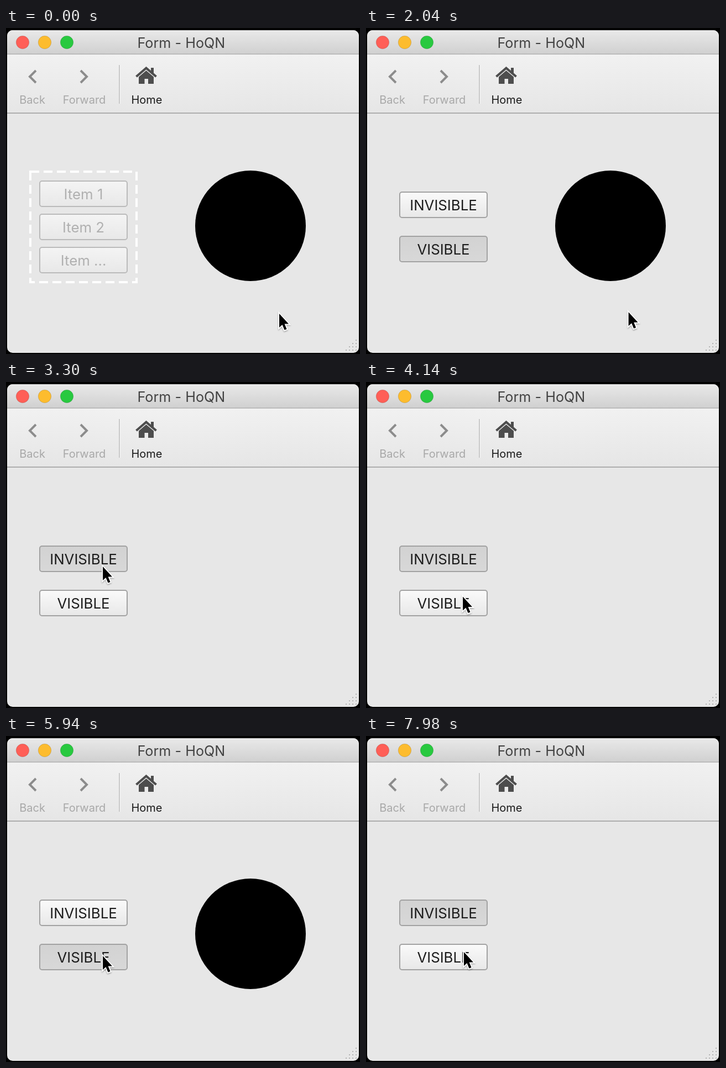
An HTML page for the animation above (8 s loop, 640 by 590 pixels).

```html
<!DOCTYPE html>
<html lang="en">
<head>
<meta charset="utf-8">
<title>Form</title>
<style>
  html, body { margin: 0; width: 100%; height: 100%; overflow: hidden; background: #000; }
  svg { display: block; width: 640px; height: 590px; }
  text { font-family: Inter, Roboto, "Liberation Sans", sans-serif; text-anchor: middle; }
  .title { font-size: 25.2px; text-anchor: start; fill: #424242; }
  .tool { font-size: 20px; fill: #a8a8a8; }
  .label { font-size: 25.8px; }
  .button rect { fill: url(#raised); stroke: #a2a2a2; stroke-width: 2; }
  .button text { fill: #1c1c1c; }
  .button.down rect { fill: url(#sunken); }
  .button.off rect { fill: url(#faded); stroke: #bababa; }
  .button.off text { fill: #b0b0b0; }
  .hidden { display: none; }
</style>
</head>
<body>
<svg viewBox="0 0 640 590">
  <defs>
    <linearGradient id="cap" x2="0" y2="1"><stop stop-color="#e9e9e9"/><stop offset="1" stop-color="#d0d0d0"/></linearGradient>
    <linearGradient id="bar" x2="0" y2="1"><stop stop-color="#f1f1f1"/><stop offset="1" stop-color="#e6e6e6"/></linearGradient>
    <linearGradient id="raised" x2="0" y2="1"><stop stop-color="#fafafa"/><stop offset="1" stop-color="#e8e8e8"/></linearGradient>
    <linearGradient id="sunken" x2="0" y2="1"><stop stop-color="#d2d2d2"/><stop offset="1" stop-color="#d8d8d8"/></linearGradient>
    <linearGradient id="faded" x2="0" y2="1"><stop stop-color="#f4f4f4"/><stop offset="1" stop-color="#e8e8e8"/></linearGradient>
    <clipPath id="frame"><rect x="2" y="4" width="636" height="584" rx="10"/></clipPath>
    <filter id="shadow" x="-50%" y="-50%" width="200%" height="200%">
      <feDropShadow dx="0" dy="1.5" stdDeviation="1.2" flood-opacity=".35"/>
    </filter>
  </defs>

  <g clip-path="url(#frame)">
    <rect width="640" height="590" fill="#e7e7e7"/>
    <rect y="4" width="640" height="43" fill="url(#cap)"/>
    <rect y="46.5" width="640" height="1.5" fill="#b3b3b3"/>
    <rect y="48" width="640" height="105" fill="url(#bar)"/>
    <rect y="153" width="640" height="2" fill="#adadad"/>
  </g>

  <g id="lights"></g>
  <text class="title" x="237.5" y="36">Form - HoQN</text>

  <g fill="none" stroke="#8c8c8c" stroke-width="4">
    <path d="M54 77L43 88L54 99"/>
    <path d="M135 77L146 88L135 99"/>
  </g>
  <rect x="204" y="67" width="2" height="70" fill="#c8c8c8"/>
  <rect x="206" y="67" width="1" height="70" fill="#fafafa"/>
  <g fill="#4d4d4d">
    <path d="M235.5 88L253.5 72.5L271.5 88" fill="none" stroke="#4d4d4d" stroke-width="4.2"/>
    <path d="M240 88.6L253.5 77L267 88.6V101H257V92H250.5V101H240Z"/>
    <rect x="262" y="72" width="5" height="11"/>
  </g>
  <text class="tool" x="47.5" y="137">Back</text>
  <text class="tool" x="141.5" y="137">Forward</text>
  <text class="tool" x="254.5" y="137" style="fill:#1a1a1a">Home</text>

  <g id="preview">
    <path d="M44 260H236V460H44Z" fill="none" stroke="#fff" stroke-width="4" stroke-dasharray="16 8"/>
  </g>
  <g id="choices"></g>
  <circle id="disc" cx="442" cy="358" r="100"/>
  <g id="grip" fill="#b2b2b2"></g>

  <g id="cursor" filter="url(#shadow)">
    <path transform="translate(2 3)" d="M0 0V25L5.5 20L9.5 29.5L13.5 28L9.6 18.5H17Z"
      stroke="#fff" stroke-width="3.6" paint-order="stroke"/>
  </g>
</svg>
<script>
const LOOP = 8000, STEP = 60;
const NS = "http://www.w3.org/2000/svg";
const byId = id => document.getElementById(id);

function add(parent, tag, attrs, text) {
  const el = document.createElementNS(NS, tag);
  for (const key in attrs) el.setAttribute(key, attrs[key]);
  if (text) el.textContent = text;
  return parent.appendChild(el);
}

function button(parent, y, label, off) {
  const g = add(parent, "g", { class: off ? "button off" : "button" });
  add(g, "rect", { x: 61, y: y + 1, width: 158, height: 46, rx: 4 });
  add(g, "text", { x: 140, y: y + 34, class: "label" }, label);
  return g;
}

const preview = byId("preview"), choices = byId("choices");
const disc = byId("disc"), cursor = byId("cursor");
["Item 1", "Item 2", "Item ..."].forEach((s, i) => button(preview, 276 + 60 * i, s, true));
const hideButton = button(choices, 296, "INVISIBLE");
const showButton = button(choices, 376, "VISIBLE");

["#ff5f57", "#fdbc2e", "#28c940"].forEach((fill, i) =>
  add(byId("lights"), "circle", { cx: 30 + 40 * i, cy: 26, r: 11.7, fill, stroke: "#000", "stroke-opacity": 0.14 }));

for (let i = 0; i < 4; i++)
  for (let j = 0; i + j < 4; j++)
    add(byId("grip"), "rect", { x: 632 - 6 * i, y: 582 - 6 * j, width: 2, height: 2 });

// The pointer glides from home to each stop in turn.
const home = { x: 492, y: 514 };
const moves = [
  { from: 1980, to: 2520, x: 173, y: 331 },
  { from: 3720, to: 4320, x: 173, y: 403 },
  { from: 5820, to: 6300, x: 173, y: 323 },
  { from: 7500, to: 7980, x: 175, y: 388 }
];
const clicks = [
  { down: 2880, up: 3000, shows: false },
  { down: 4860, up: 5040, shows: true },
  { down: 6540, up: 6660, shows: false }
];

const glide = k => Math.sin(k * Math.PI / 2) ** 1.6;

// y lags behind x, which bends the path.
function pointerAt(t) {
  let { x, y } = home;
  for (const m of moves) {
    const k = glide(Math.min(1, Math.max(0, (t - m.from) / (m.to - m.from))));
    x += (m.x - x) * k;
    y += (m.y - y) * k ** 1.5;
  }
  return [x, y];
}

function draw(now) {
  const t = Math.floor(now % LOOP / STEP) * STEP;
  let shown = true, pressed = null;
  for (const c of clicks) {
    if (t >= c.up) shown = c.shows;
    else if (t >= c.down) pressed = c.shows;
  }
  preview.classList.toggle("hidden", t >= STEP);
  choices.classList.toggle("hidden", t < STEP);
  hideButton.classList.toggle("down", !shown || pressed === false);
  showButton.classList.toggle("down", shown || pressed === true);
  disc.classList.toggle("hidden", !shown);
  const [x, y] = pointerAt(t);
  cursor.setAttribute("transform", `translate(${x.toFixed(1)} ${y.toFixed(1)})`);
}

const start = performance.now();
function tick() {
  draw(performance.now() - start);
  requestAnimationFrame(tick);
}
tick();
</script>
</body>
</html>
```
